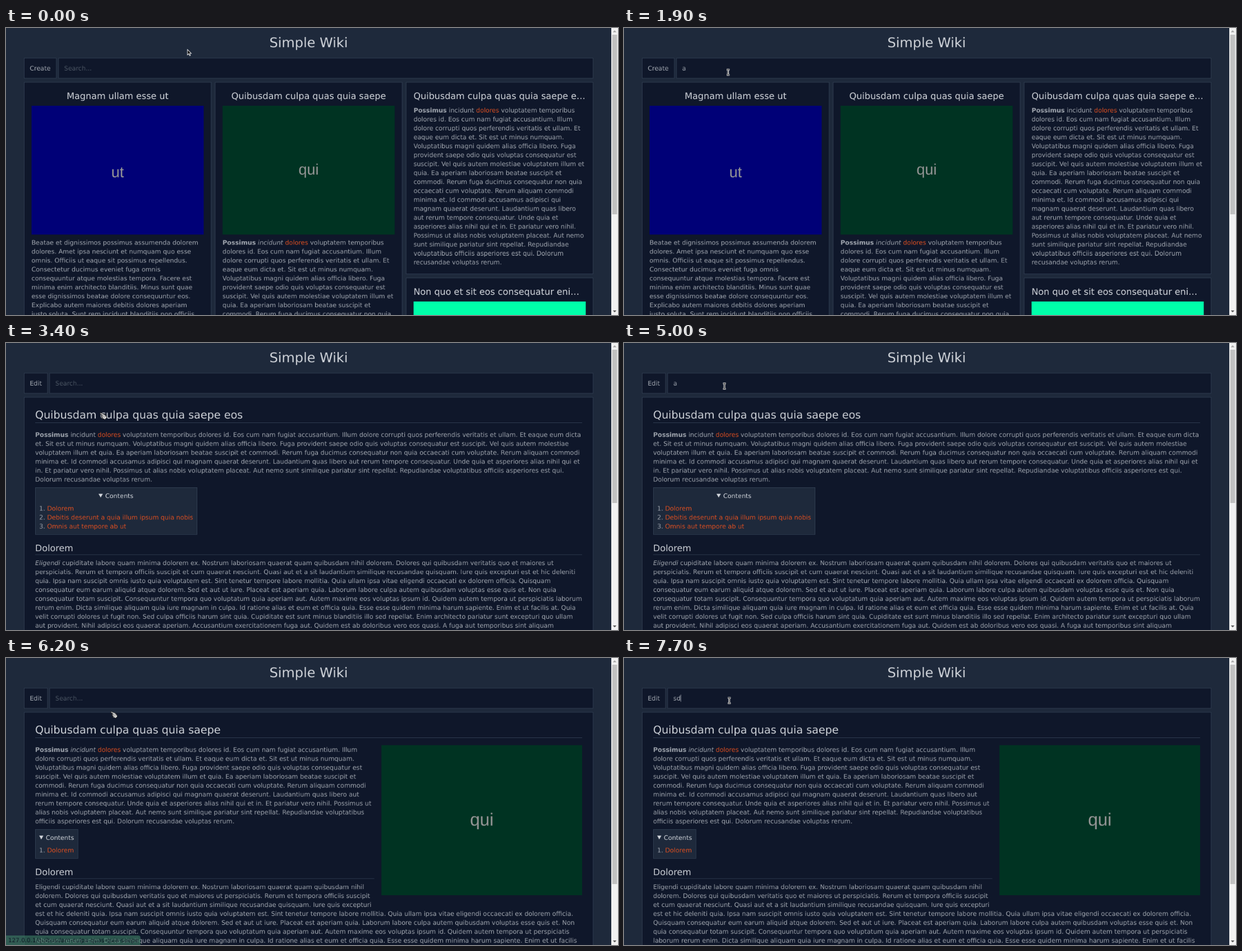
An HTML page that plays this animation: 1091 by 513 pixels, repeating every 8000 ms.

```html
<!DOCTYPE html>
<html lang="la">
<head>
<meta charset="utf-8">
<title>Simple Wiki</title>
<style>
html, body { margin: 0; width: 100%; height: 100%; overflow: hidden; background: #1e293b; }
/* laid out at 1366px and scaled down as one layer, so text keeps fractional offsets */
svg {
  position: absolute; left: 0; top: 0; width: 1366px; height: 643px;
  transform-origin: 0 0; transform: scale(.79868); will-change: transform;
}
text { font: 14px "DejaVu Sans", sans-serif; fill: #9fa5ae; text-rendering: geometricPrecision; white-space: pre; }
.h1 { font-size: 30px; } .h2 { font-size: 24px; } .h3 { font-size: 20px; }
.h1, .h2, .h3, .light { fill: #d1d5db; }
.mid { text-anchor: middle; }
.hint { fill: #4b5563; }
.pic { font-family: "Liberation Sans", Arial, sans-serif; fill: #969696; text-anchor: middle; }
.b { font-weight: bold; } .i { font-style: italic; } .a { fill: #dc4f22; }
.box { fill: #0f172a; stroke: #334155; }
.raised { fill: #1e293b; stroke: #334155; }
.rule { fill: #334155; }
.url { font-size: 13px; fill: #0c1620; }
</style>
</head>
<body>
<svg id="stage"></svg>
<script>
const LOOP = 8000, TICK = 100, SCALE = 1366 / 1091;

// *bold*, _italic_ and ~link~ inside running text
const style = s => s
  .replace(/\*(.+?)\*/g, '<tspan class="b">$1</tspan>')
  .replace(/_(.+?)_/g, '<tspan class="i">$1</tspan>')
  .replace(/~(.+?)~/g, '<tspan class="a">$1</tspan>');
const text = (x, y, s, cls = '') => `<text x="${x}" y="${y}" class="${cls}">${style(s)}</text>`;
const lines = (x, y, s) => s.trim().split('\n').map((l, i) => text(x, y + 20 * i, l)).join('');
const rect = (x, y, w, h, fill) => `<rect x="${x}" y="${y}" width="${w}" height="${h}" fill="${fill}"/>`;
const box = (x, y, w, h, cls = 'box') =>
  `<rect x="${x + .5}" y="${y + .5}" width="${w - 1}" height="${h - 1}" class="${cls}"/>`;
const rule = (y, right) => `<rect x="65" y="${y}" width="${right - 65}" height="1" class="rule"/>`;
const group = (id, s) => `<g id="${id}">${s}</g>`;
const picture = (x, y, w, fill, word, base) => rect(x, y, w, w * .75, fill) +
  `<text x="${x + w / 2}" y="${y + base * w}" class="pic" style="font-size:${w * .088}px">${word}</text>`;

const intro = `
dolores id. Eos cum nam fugiat accusantium. Illum
dolore corrupti quos perferendis veritatis et ullam. Et
eaque eum dicta et. Sit est ut minus numquam.
Voluptatibus magni quidem alias officia libero. Fuga
provident saepe odio quis voluptas consequatur est
suscipit. Vel quis autem molestiae voluptatem illum et
quia. Ea aperiam laboriosam beatae suscipit et
commodi. Rerum fuga ducimus consequatur non quia
occaecati cum voluptate. Rerum aliquam commodi
minima et. Id commodi accusamus adipisci qui
magnam quaerat deserunt. Laudantium quas libero
aut rerum tempore consequatur. Unde quia et
asperiores alias nihil qui et in. Et pariatur vero nihil.
Possimus ut alias nobis voluptatem placeat. Aut nemo
sunt similique pariatur sint repellat. Repudiandae
voluptatibus officiis asperiores est qui. Dolorum
recusandae voluptas rerum.`;

const COL = 1255 / 3, colX = i => 40 + i * (COL + 8), INNER = COL - 34;

function home() {
  const [x0, x1, x2] = [0, 1, 2].map(i => colX(i) + 17);
  return box(colX(0), 121, COL, 600) + box(colX(1), 121, COL, 600) +
    box(colX(2), 121, COL, 430) + box(colX(2), 559, COL, 200) +
    text(x0 + INNER / 2, 159, 'Magnam ullam esse ut', 'h3 mid') +
    text(x1 + INNER / 2, 159, 'Quibusdam culpa quas quia saepe', 'h3 mid') +
    text(x2, 159, 'Quibusdam culpa quas quia saepe e…', 'h3') +
    text(x2, 597, 'Non quo et sit eos consequatur eni…', 'h3') +
    picture(x0, 174, INNER, '#000077', 'ut', .416) +
    picture(x1, 174, INNER, '#003322', 'qui', .4015) +
    rect(x2, 612, INNER, 100, '#00ffaa') +
    lines(x0, 485, `
Beatae et dignissimos possimus assumenda dolorem
dolores. Amet ipsa nesciunt et numquam quo esse
omnis. Officiis ut eaque sit possimus repellendus.
Consectetur ducimus eveniet fuga omnis
consequuntur atque molestias tempora. Facere est
minima enim architecto blanditiis. Minus sunt quae
esse dignissimos beatae dolore consequuntur eos.
Explicabo autem maiores debitis dolores aperiam
iusto soluta. Sunt rem incidunt blanditiis non officiis`) +
    lines(x1, 485, '*Possimus* _incidunt_ ~dolores~ voluptatem temporibus' +
      intro.split('\n').slice(0, 9).join('\n')) +
    lines(x2, 189, '*Possimus* incidunt ~dolores~ voluptatem temporibus' + intro);
}

function contents(y, w, x, items) {
  return box(65, y, w, 46 + 20 * items.length, 'raised') +
    `<path d="M${x} ${y + 14.5}h9.4l-4.7 8.6z" fill="#d1d5db"/>` +
    text(x + 14.8, y + 24, 'Contents', 'light') +
    items.map((s, i) => text(74, y + 52 + 20 * i, `${i + 1}. ~${s}~`)).join('');
}

const article = title => box(40, 121, 1271, 600) + text(65, 169, title, 'h2') + rule(178, 1286);

const second = article('Quibusdam culpa quas quia saepe eos') + lines(65, 210, `
*Possimus* incidunt ~dolores~ voluptatem temporibus dolores id. Eos cum nam fugiat accusantium. Illum dolore corrupti quos perferendis veritatis et ullam. Et eaque eum dicta
et. Sit est ut minus numquam. Voluptatibus magni quidem alias officia libero. Fuga provident saepe odio quis voluptas consequatur est suscipit. Vel quis autem molestiae
voluptatem illum et quia. Ea aperiam laboriosam beatae suscipit et commodi. Rerum fuga ducimus consequatur non quia occaecati cum voluptate. Rerum aliquam commodi
minima et. Id commodi accusamus adipisci qui magnam quaerat deserunt. Laudantium quas libero aut rerum tempore consequatur. Unde quia et asperiores alias nihil qui et
in. Et pariatur vero nihil. Possimus ut alias nobis voluptatem placeat. Aut nemo sunt similique pariatur sint repellat. Repudiandae voluptatibus officiis asperiores est qui.
Dolorum recusandae voluptas rerum.`) +
  contents(323, 362, 206.6, ['Dolorem', 'Debitis deserunt a quia illum ipsum quia nobis', 'Omnis aut tempore ab ut']) +
  text(65, 466, 'Dolorem', 'h3') + rule(473, 1286) + lines(65, 497, `
_Eligendi_ cupiditate labore quam minima dolorem ex. Nostrum laboriosam quaerat quam quibusdam nihil dolorem. Dolores qui quibusdam veritatis quo et maiores ut
perspiciatis. Rerum et tempora officiis suscipit et cum quaerat nesciunt. Quasi aut et a sit laudantium similique recusandae quisquam. Iure quis excepturi est et hic deleniti
quia. Ipsa nam suscipit omnis iusto quia voluptatem est. Sint tenetur tempore labore mollitia. Quia ullam ipsa vitae eligendi occaecati ex dolorem officia. Quisquam
consequatur eum earum aliquid atque dolorem. Sed et aut ut iure. Placeat est aperiam quia. Laborum labore culpa autem quibusdam voluptas esse quis et. Non quia
consequatur totam suscipit. Consequuntur tempora quo voluptatum quia aperiam aut. Autem maxime eos voluptas ipsum id. Quidem autem tempora ut perspiciatis laborum
rerum enim. Dicta similique aliquam quia iure magnam in culpa. Id ratione alias et eum et officia quia. Esse esse quidem minima harum sapiente. Enim et ut facilis at. Quia
velit corrupti dolores ut fugit non. Sed culpa officiis harum sint quia. Cupiditate est sunt minus blanditiis illo sed repellat. Enim architecto pariatur sunt excepturi quo ullam
aut provident. Nihil adipisci eos quaerat aperiam. Accusantium exercitationem fuga aut. Quidem est ab doloribus vero eos quasi. A fuga aut temporibus sint aliquam`);

const first = article('Quibusdam culpa quas quia saepe') + lines(65, 210, `
*Possimus* _incidunt_ ~dolores~ voluptatem temporibus dolores id. Eos cum nam fugiat accusantium. Illum
dolore corrupti quos perferendis veritatis et ullam. Et eaque eum dicta et. Sit est ut minus numquam.
Voluptatibus magni quidem alias officia libero. Fuga provident saepe odio quis voluptas consequatur est
suscipit. Vel quis autem molestiae voluptatem illum et quia. Ea aperiam laboriosam beatae suscipit et
commodi. Rerum fuga ducimus consequatur non quia occaecati cum voluptate. Rerum aliquam commodi
minima et. Id commodi accusamus adipisci qui magnam quaerat deserunt. Laudantium quas libero aut
rerum tempore consequatur. Unde quia et asperiores alias nihil qui et in. Et pariatur vero nihil. Possimus ut
alias nobis voluptatem placeat. Aut nemo sunt similique pariatur sint repellat. Repudiandae voluptatibus
officiis asperiores est qui. Dolorum recusandae voluptas rerum.`) +
  picture(838, 195, 448, '#003322', 'qui', .4015) +
  contents(383, 96, 74, ['Dolorem']) +
  text(65, 486, 'Dolorem', 'h3') + rule(493, 822) + lines(65, 517, `
Eligendi cupiditate labore quam minima dolorem ex. Nostrum laboriosam quaerat quam quibusdam nihil
dolorem. Dolores qui quibusdam veritatis quo et maiores ut perspiciatis. Rerum et tempora officiis suscipit
et cum quaerat nesciunt. Quasi aut et a sit laudantium similique recusandae quisquam. Iure quis excepturi
est et hic deleniti quia. Ipsa nam suscipit omnis iusto quia voluptatem est. Sint tenetur tempore labore mollitia. Quia ullam ipsa vitae eligendi occaecati ex dolorem officia.
Quisquam consequatur eum earum aliquid atque dolorem. Sed et aut ut iure. Placeat est aperiam quia. Laborum labore culpa autem quibusdam voluptas esse quis et. Non
quia consequatur totam suscipit. Consequuntur tempora quo voluptatum quia aperiam aut. Autem maxime eos voluptas ipsum id. Quidem autem tempora ut perspiciatis
laborum rerum enim. Dicta similique aliquam quia iure magnam in culpa. Id ratione alias et eum et officia quia. Esse esse quidem minima harum sapiente. Enim et ut facilis`);

// button and search field; x is the left edge of the field
const bar = (label, x) => box(40, 67, x - 44, 46) + text(53, 95, label) + box(x, 67, 1311 - x, 46);
const FIELD = { home: 116.8, second: 97.1, first: 97.1 };
const THUMB = { home: 402, second: 343, first: 491 };

const items = ['Quibusdam culpa quas quia saepe', 'Quibusdam culpa quas quia saepe eos',
  'Non quo et sit eos consequatur enim velit earum', 'Magnam ullam esse ut'];
const menu = box(0, 112, 377.4, 114) + `<rect id="hover" x="1" width="375.4" height="28" fill="#1e293b"/>` +
  items.map((s, i) => text(17, 132 + 28 * i, s)).join('');

const scrollbar = rect(1351, 0, 15, 643, '#f1f1f1') +
  '<rect id="thumb" x="1353" y="15" width="11" fill="#c1c1c1"/>' +
  '<path d="M1354.5 9.5h8l-4-4.5z" fill="#a3a3a3"/><path d="M1354.5 632h8l-4 4.5z" fill="#505050"/>';

const status = '<path d="M0 621h295q5 0 5 5v17H0z" fill="#3f7f66" opacity=".93"/>' +
  text(5, 636, '127.0.0.1/quibusdam-culpa-quas-quia-saepe', 'url');

// each drawn around its hot spot
const pointers =
  group('arrow', '<path d="M.5 .5v9.6l2.2-2 1.6 3.5 1.6-.7-1.6-3.4h3z" fill="#111" stroke="#fff" stroke-width=".9"/>') +
  group('beam', '<path d="M-2.6-4.8h5.2M-2.6 4.8h5.2M0-4.8v9.6" fill="none" stroke="#fff" stroke-width="2.8"/>' +
    '<path d="M-2.3-4.8h4.6M-2.3 4.8h4.6M0-4.8v9.6" fill="none" stroke="#111" stroke-width="1"/>') +
  group('hand', '<path d="M.6 .8Q1.4 0 2.6 .6L6.5 2.4 9 3.2 12 6.8 12.6 9 9.2 12.4 7.4 11 4.6 10.4 4.2 9.2 5.6 8.8 3.2 7.6 3.4 6.4 5 6 2.8 5 3.2 3.8 4.6 3.8.8 2z" ' +
    'fill="#eee" stroke="#222" stroke-width=".9"/><path d="M5 3.6l5 4.6M5.6 6l3.6 4M7.8 3.6l3.6 4" stroke="#333" stroke-width=".6"/>');

const stage = document.getElementById('stage');
stage.innerHTML = rect(0, 0, 1366, 643, '#1e293b') +
  group('home', home() + bar('Create', FIELD.home)) +
  group('second', second + bar('Edit', FIELD.second)) +
  group('first', first + bar('Edit', FIELD.first)) +
  text(675.5, 43, 'Simple Wiki', 'h1 mid') +
  '<text id="query" y="95"></text><rect id="caret" y="82" width="1" height="16" fill="#b4b9c2"/>' +
  group('menu', menu) + scrollbar + group('status', status) + group('pointer', pointers);

const el = {};
stage.querySelectorAll('[id]').forEach(n => el[n.id] = n);
const show = (n, on) => n.setAttribute('display', on ? 'inline' : 'none');
const within = (t, a, b) => t >= a && t < b;

// pointer legs: start, end, from x, y, to x, y
const legs = [
  [100, 900, 323, 38, 185.5, 79],
  [2000, 2400, 185.5, 79, 167, 124.5],
  [3600, 4100, 167, 124.5, 179, 77],
  [5200, 5700, 179, 77, 186, 95.5],
  [6500, 6800, 186, 95.5, 187.7, 76]
];
function pointerAt(t) {
  const [a, b, x0, y0, x1, y1] = legs.filter(l => t >= l[0]).pop() || legs[0];
  const u = Math.min(1, Math.max(0, (t - a) / (b - a))), e = u * u * (3 - 2 * u);
  return [x0 + (x1 - x0) * e, y0 + (y1 - y0) * e];
}

function shape(t, y) {
  if (within(t, 2400, 3700) || within(t, 6200, 6600)) return 'hand';
  return y > 60 && y < 90 ? 'beam' : 'arrow';
}

function typed(t) {
  if (t >= 7500) return t < 7700 ? 's' : 'sd';
  return within(t, 1300, 3400) || within(t, 4400, 6200) ? 'a' : '';
}

function statusAlpha(t) {
  if (t < 5700 || t >= 6400) return 0;
  return t < 5800 ? .5 : t < 6200 ? 1 : t < 6300 ? .65 : .3;
}

function draw(time) {
  const t = Math.floor(time / TICK) * TICK;
  const page = t < 3400 ? 'home' : t < 6200 ? 'second' : 'first';
  for (const p of ['home', 'second', 'first']) show(el[p], p === page);
  el.thumb.setAttribute('height', THUMB[page]);

  const x = FIELD[page], word = typed(t);
  const focus = within(t, 1000, 3400) || within(t, 4200, 6200) || t >= 6900;
  el.query.textContent = word || (focus ? '' : 'Search...');
  el.query.setAttribute('class', word ? '' : 'hint');
  el.query.setAttribute('x', x + 13);
  const width = word ? el.query.getComputedTextLength() : 0;
  el.caret.setAttribute('x', x + 13 + width);
  show(el.caret, within(t, 1000, 1900) || within(t, 4200, 5000) || t >= 6900);

  const [px, py] = pointerAt(t), row = Math.floor((py * SCALE - 113) / 28);
  show(el.menu, within(t, 2000, 3400) || within(t, 5100, 6200));
  el.menu.setAttribute('transform', `translate(${x})`);
  show(el.hover, row >= 0);
  el.hover.setAttribute('y', 113 + 28 * Math.max(0, row));
  el.status.setAttribute('opacity', statusAlpha(t));

  const kind = shape(t, py);
  for (const k of ['arrow', 'beam', 'hand']) show(el[k], k === kind);
  el.pointer.setAttribute('transform', `scale(${SCALE}) translate(${px} ${py})`);
}

const start = performance.now();
function frame() {
  draw((performance.now() - start) % LOOP);
  requestAnimationFrame(frame);
}
frame();
</script>
</body>
</html>
```
